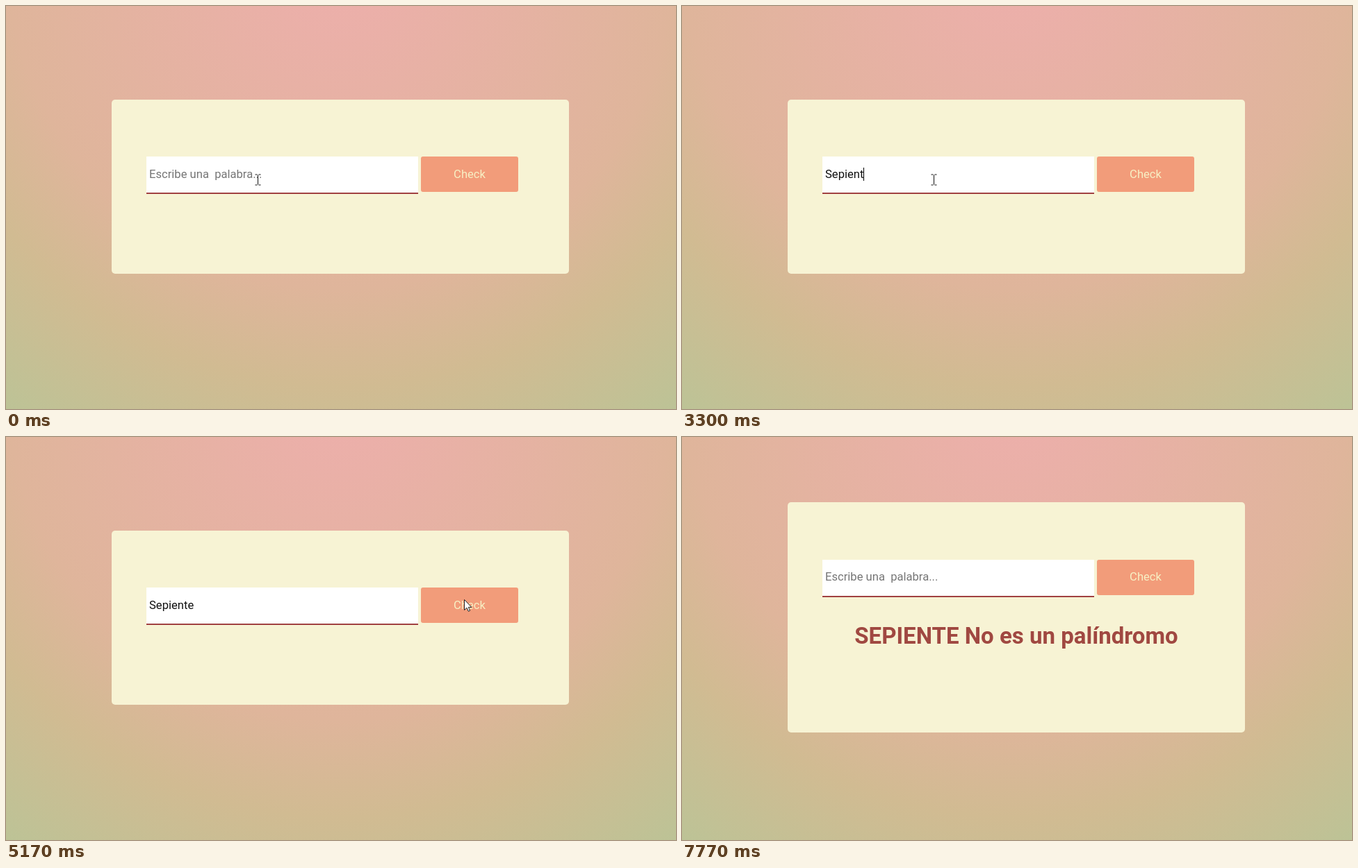
An HTML page that plays this animation: 964 by 581 pixels, repeating every 8 s.

```html
<!DOCTYPE html>
<html lang="es">
<head>
<meta charset="utf-8">
<title>Palíndromo</title>
<style>
html, body { margin: 0; width: 100%; height: 100%; overflow: hidden; }
body {
  position: relative;
  font: 16.6px/19px Roboto, sans-serif;
  background: radial-gradient(circle at 482px -72px,
    #ecafaa 60px, #dfb59b 480px, #d1bb92 620px, #bcc396 815px);
}
body div, svg { position: absolute; white-space: pre; }
#card { left: 152px; width: 658px; border-radius: 5px; background: #f7f3d4; }
#row { left: 0; width: 964px; }
#field { left: 202px; top: 0; width: 391px; height: 52px; background: #fff; border-bottom: 2px solid #a04040; }
#button { left: 597px; top: 0; width: 140px; height: 51px; border-radius: 3px; background: #f29c7a; }
#label { left: 597px; width: 140px; text-align: center; color: #f7f0c4; }
#word { left: 206px; height: 19px; }
#caret { width: 1px; height: 19px; background: #000; }
#result { left: 152px; top: 267px; width: 658px; font: bold 33px/39px Roboto, sans-serif; text-align: center; color: #a04841; }
#popup { top: 193px; height: 39px; box-sizing: border-box; border: 1px solid #666; background: #2b2b2b;
  color: #fff; font: 12.3px/38px "Open Sans", sans-serif; padding-left: 7px; }
#popup span { margin-right: 19px; }
svg { left: 0; top: 0; overflow: visible; }
</style>
</head>
<body>
<div id="card"></div>
<div id="row"><div id="field"></div><div id="button"></div></div>
<div id="label">Check</div>
<div id="word"></div>
<div id="caret"></div>
<div id="result">SEPIENTE No es un palíndromo</div>
<div id="popup"></div>
<svg width="1" height="1">
  <path id="beam" fill="none" stroke="#111" d="M-4 -7.5H-1M1 -7.5H4M-4 7.5H-1M1 7.5H4M0 -7V7"/>
  <path id="arrow" fill="#fff" stroke="#222" d="M.5 .5V15.5L4 12.2L6.3 17.3L8.6 16.3L6.3 11.4H10.8Z"/>
</svg>
<script>
const LOOP = 8000, PRESS = 5170, SUBMIT = 5300;
const $ = id => document.getElementById(id);
const show = (el, on) => { el.style.display = on ? '' : 'none'; };

// time, typed text, caret x (0 = hidden)
const typing = [
  [0, '', 0], [500, '', 206], [640, '', 0], [1300, '', 206],
  [1640, 'S', 216], [1840, 'Se', 224], [2040, 'Sep', 233], [2640, 'Sep', 0],
  [2900, 'Sepi', 237], [3040, 'Sepie', 247], [3240, 'Sepien', 256],
  [3300, 'Sepient', 261], [3440, 'Sepiente', 270], [3900, 'Sepiente', 0],
  [4440, 'Sepiente', 270], [4500, 'Sepiente', 0], [6240, 'Sepiente', 270],
  [6440, 'Sepiente', 0], [7240, '', 206], [7770, '', 0]
];
// time, left, right, suggestions
const popups = [
  [0], [1900, 216, 321, 'So Si See'], [2100, 224, 347, 'See Set Sent'],
  [2300, 233, 433, 'Step September Separate'], [3240],
  [3770, 270, 488, 'Serpiente Sapient Serpientes'], [4700]
];

const at = (list, t) => list.findLast(step => step[0] <= t);
const ease = (t, from, to) => {
  const p = Math.min(1, Math.max(0, (t - from) / (to - from)));
  return p * p * (3 - 2 * p);
};
const curve = (a, b, c, p) => a * (1 - p) ** 2 + 2 * b * p * (1 - p) + c * p * p;

function drawPointer(t) {
  const back = t >= SUBMIT;
  const p = back ? ease(t, 5440, 6240) : ease(t, 4640, 5060);
  const x = back ? curve(659, 560, 420, p) : 363 + 296 * p;
  const y = back ? curve(234, 261, 203, p) : 251 - 17 * p;
  const inField = x < 593 && (!back || y < 230);
  const visible = t < 6300;
  show($('beam'), visible && inField);
  show($('arrow'), visible && !inField);
  const half = inField ? 0.5 : 0;
  const place = `translate(${Math.floor(x) - half} ${Math.floor(y) - half})`;
  $(inField ? 'beam' : 'arrow').setAttribute('transform', place);
}

function draw(t) {
  const done = t >= SUBMIT;
  const lineTop = done ? 192 : 233;
  $('card').style.top = (done ? 94 : 135) + 'px';
  $('card').style.height = (done ? 332 : 251) + 'px';
  $('row').style.top = (done ? 177 : 217) + 'px';
  for (const id of ['label', 'word', 'caret']) $(id).style.top = lineTop + 'px';
  show($('result'), done);

  const [, text, caretX] = at(typing, t);
  const selected = t >= 4500 && t < PRESS || t >= 6440 && t < 7240;
  const word = $('word');
  word.textContent = text || 'Escribe una\u00a0 palabra...';
  word.style.color = selected ? '#fff' : text ? '#111' : '#757575';
  word.style.background = selected ? '#0078d7' : 'none';
  show($('caret'), caretX);
  $('caret').style.left = caretX + 'px';

  const [, left, right, words] = at(popups, t);
  show($('popup'), words);
  if (words) {
    $('popup').style.left = left + 'px';
    $('popup').style.width = right - left + 'px';
    $('popup').innerHTML = words.split(' ').map(w => `<span>${w}</span>`).join('');
  }
  drawPointer(t);
}

function frame(now) {
  draw(now % LOOP);
  requestAnimationFrame(frame);
}
draw(0);
requestAnimationFrame(frame);
</script>
</body>
</html>
```
